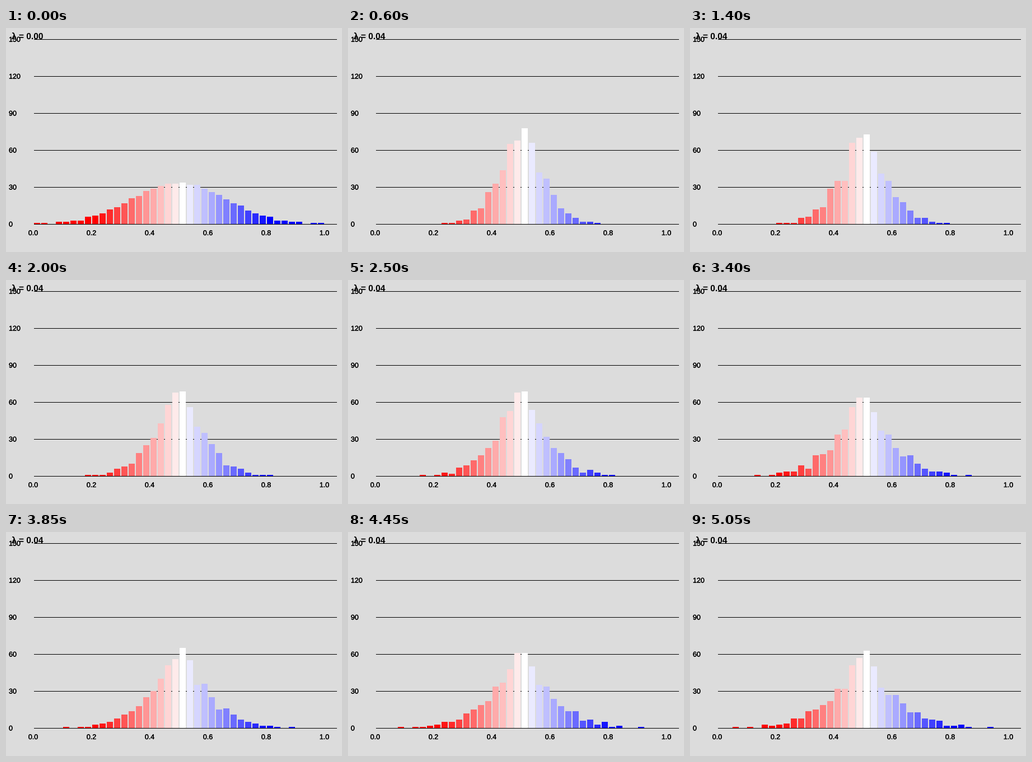
A matplotlib script that plays this animation: 600x400 px, repeating every 5.1 s.

```python
import matplotlib.pyplot as plt
import numpy as np
from matplotlib.animation import FuncAnimation
from matplotlib.patches import Rectangle
from matplotlib.patheffects import withStroke

plt.rcParams["text.hinting"] = "no_hinting"

W, H, DPI = 600, 400, 100
FRAMES, STEP = 102, 50
BINS, PITCH, BAR_W = 40, 13, 11
LEFT, BASE = 50, 350
AGENTS, MID, SPREAD = 548, 20, 6.5

# Normal scores: one evenly ranked agent per quantile.
grid = np.linspace(-4, 4, 4001)
cdf = np.cumsum(np.exp(-grid**2 / 2))
score = np.interp((np.arange(AGENTS) + 0.5) / AGENTS, cdf / cdf[-1], grid)

rng = np.random.default_rng(7)
phase = rng.uniform(0, 2 * np.pi, AGENTS)
rate = rng.normal(0, 4, AGENTS)


def histogram(frame):
    """Contract quickly to a sharp peak, then let shoulders and tails grow."""
    t = frame * STEP / 1000
    start = np.exp(-t / 0.15)
    core = 2.6 + 0.16 * t
    tail = 0.5 + 0.35 * t
    settled = core + tail * score**2 / (1 + score**2)
    width = SPREAD * start + settled * (1 - start)
    wander = 0.3 * (1 - start) * np.sin(phase + rate * t)
    x = MID + score * width + wander
    return np.bincount(np.clip(x, 0, BINS - 0.01).astype(int), minlength=BINS)


def height(n):
    return n * 11 // 5


def bar_color(i):
    fade = max(0, 1 - abs(i - MID) / 12)
    return (1, fade, fade) if i < MID else (fade, fade, 1)


def label(x, y, text, px=12.5, **kw):
    return ax.text(x, y, text, fontsize=px * 72 / DPI, family="Liberation Sans",
                   va="baseline", **kw)


fig = plt.figure(figsize=(W / DPI, H / DPI), dpi=DPI, facecolor="#dcdcdc")
ax = fig.add_axes([0, 0, 1, 1])
ax.set(xlim=(0, W), ylim=(H, 0))
ax.axis("off")

heavier = [withStroke(linewidth=0.25, foreground="black")]
for v in range(0, 151, 30):
    y = BASE - height(v)
    ax.add_patch(Rectangle((LEFT, y), 541, 1, fc="black", lw=0, zorder=1))
    label(5, y + 4.5, str(v), path_effects=heavier)
for k in range(6):
    label(48.5 + 104 * k, 370, f"{k / 5:.1f}", ha="center", path_effects=heavier)

bars = [ax.add_patch(Rectangle((LEFT + PITCH * i, BASE), BAR_W, 0, fc=bar_color(i),
                               lw=0, snap=False, zorder=2)) for i in range(BINS)]
title = label(10, 20, "", px=15.5, weight="bold")


def update(frame):
    for bar, n in zip(bars, histogram(frame)):
        bar.set_y(BASE - height(n))
        bar.set_height(height(n))
    title.set_text(f"λ = {0.04 if frame else 0:.2f}")
    return [*bars, title]


anim = FuncAnimation(fig, update, frames=FRAMES, interval=STEP,
                     init_func=lambda: update(0), repeat=True)
plt.show()
```
